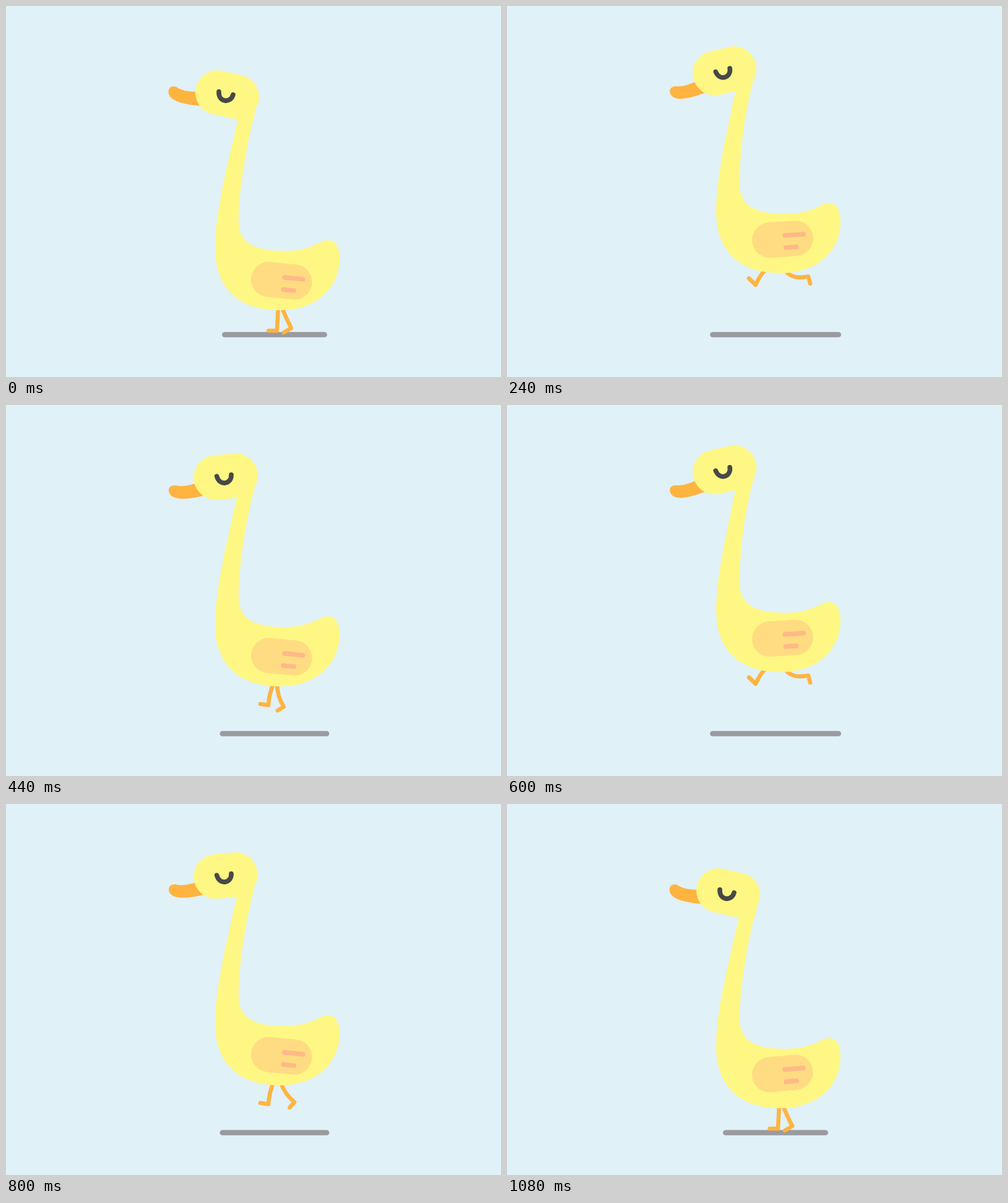
An HTML page for the animation above (1.1 s loop, 800x600 px).

```html
<!DOCTYPE html>
<html>
<head>
<meta charset="utf-8">
<style>
html, body { margin: 0; width: 100%; height: 100%; overflow: hidden; background: #e0f1f8; }
svg { display: block; width: 100vw; height: 100vh; }
.line { fill: none; stroke-linecap: round; stroke-linejoin: round; }
</style>
</head>
<body>
<svg viewBox="0 0 800 600">
  <path id="shadow" class="line" stroke="#9a9b9f" stroke-width="8.6"/>
  <g id="legs" class="line" stroke="#ffb440" stroke-width="6.6">
    <path id="front"/>
    <path id="back"/>
  </g>
  <path id="body" fill="#fff783"/>
  <g id="wing" class="line">
    <path d="M424.5 440H466.5" stroke="#ffdc82" stroke-width="57"/>
    <path d="M449.7 434.2H479.8M449.7 453.9H467" stroke="#ffb988" stroke-width="7.6"/>
  </g>
  <g id="head">
    <path d="M320 162C295 160 263 156 262.5 139C262.5 130 271 128 277 132C285 137 296 139 320 139Z" fill="#ffb440"/>
    <path class="line" d="M342 140L373 147" stroke="#fff783" stroke-width="72"/>
    <path class="line" d="M344 138.5C343 156 363 158 367 143.5" stroke="#484848" stroke-width="7.6"/>
  </g>
</svg>
<script>
const LOOP = 1100, HOP = 360, STEP = 20;
const TIMES = [0, 80, 240, HOP];
const PIVOT = [271, 137];  // the beak tip stays in place while the head turns
const $ = id => document.getElementById(id);

// Smooth curve through keys, flat at both ends and at every peak
function curve(p, vals, times = TIMES) {
  const slope = i => (vals[i + 1] - vals[i]) / (times[i + 1] - times[i]);
  const tangent = i => {
    if (i === 0 || i === vals.length - 1) return 0;
    const a = slope(i - 1), b = slope(i);
    return a * b > 0 ? 2 * a * b / (a + b) : 0;
  };
  let i = 0;
  while (i < times.length - 2 && p > times[i + 1]) i++;
  const h = times[i + 1] - times[i], u = (p - times[i]) / h, v = 1 - u;
  return vals[i] * v * v * (1 + 2 * u) + vals[i + 1] * u * u * (3 - 2 * u)
    + h * u * v * (tangent(i) * v - tangent(i + 1) * u);
}

// Leg poses: hip, bend, ankle, toe
const FRONT = [
  [440, 486, 439, 505, 438, 525, 424.5, 525],
  [433, 485, 425, 505, 424, 522.5, 411, 520.5],
  [419, 486, 409, 494, 402, 511, 391, 500.5]
];
const BACK = [
  [446, 488, 453, 505, 461, 521, 449, 528],
  [443, 485, 450, 506, 466, 519, 458.5, 528],
  [449, 486, 458, 503, 487, 497.5, 490, 509]
];
const BACK_CLOSE = [438, 486, 438, 508, 449, 525, 439, 531];

function leg(p, [stand, rise, split]) {
  const [hx, hy, bx, by, ax, ay, tx, ty] =
    stand.map((s, i) => curve(p, [s, rise[i], split[i], s]));
  return `M${hx} ${hy}Q${bx} ${by} ${ax} ${ay}L${tx} ${ty}`;
}

function bodyPath(lift, turn) {
  const r = turn * Math.PI / 180, c = Math.cos(r), s = Math.sin(r);
  const nx = PIVOT[0] + 102 * c - 10 * s, ny = PIVOT[1] + 102 * s + 10 * c;
  const neck = (x, y) => `${nx + x} ${ny + y} `;
  const low = (...pts) => pts.map((v, i) => i % 2 ? v - lift : v).join(' ') + ' ';
  return 'M' + neck(2, 36) + 'L' + neck(0, 0) + 'L' + neck(31, 20)
    + 'C' + neck(19, 63) + low(376, 290, 376, 348)
    + 'C' + low(376, 385, 405, 396, 448, 396)
    + 'C' + low(480, 396, 497, 388, 508, 382)
    + 'C' + low(524, 374, 539, 380, 539, 408)
    + 'C' + low(539, 460, 497, 492, 442, 492)
    + 'C' + low(378, 492, 338, 458, 338, 392)
    + 'C' + low(338, 335, 356, 265) + neck(2, 36) + 'Z';
}

function draw(now) {
  const t = Math.floor(now % LOOP / STEP) * STEP;
  const hop = Math.min(2, Math.floor(t / HOP)), p = t - hop * HOP;
  const lift = curve(p, [0, 37, 63, 60, 0], [0, 80, 200, 240, HOP]);
  const turn = curve(p, [0, -18.5, -26, 0]);
  const flap = curve(p, [5.7, 5.5, -3.8, hop === 2 ? -5.5 : 5.7]);
  const half = curve(p, [80.7, 84.2, 101.7, 80.7]);

  $('shadow').setAttribute('d', `M${434 - half} 531.5H${434 + half}`);
  $('front').setAttribute('d', leg(p, FRONT));
  $('back').setAttribute('d', leg(p, hop === 1 ? [BACK[0], BACK_CLOSE, BACK[2]] : BACK));
  $('legs').setAttribute('transform', `translate(0 ${-lift})`);
  $('body').setAttribute('d', bodyPath(lift, turn));
  $('wing').setAttribute('transform', `translate(0 ${-lift}) rotate(${flap} 402 440)`);
  $('head').setAttribute('transform', `rotate(${turn} ${PIVOT})`);
  requestAnimationFrame(draw);
}
draw(0);
</script>
</body>
</html>
```
